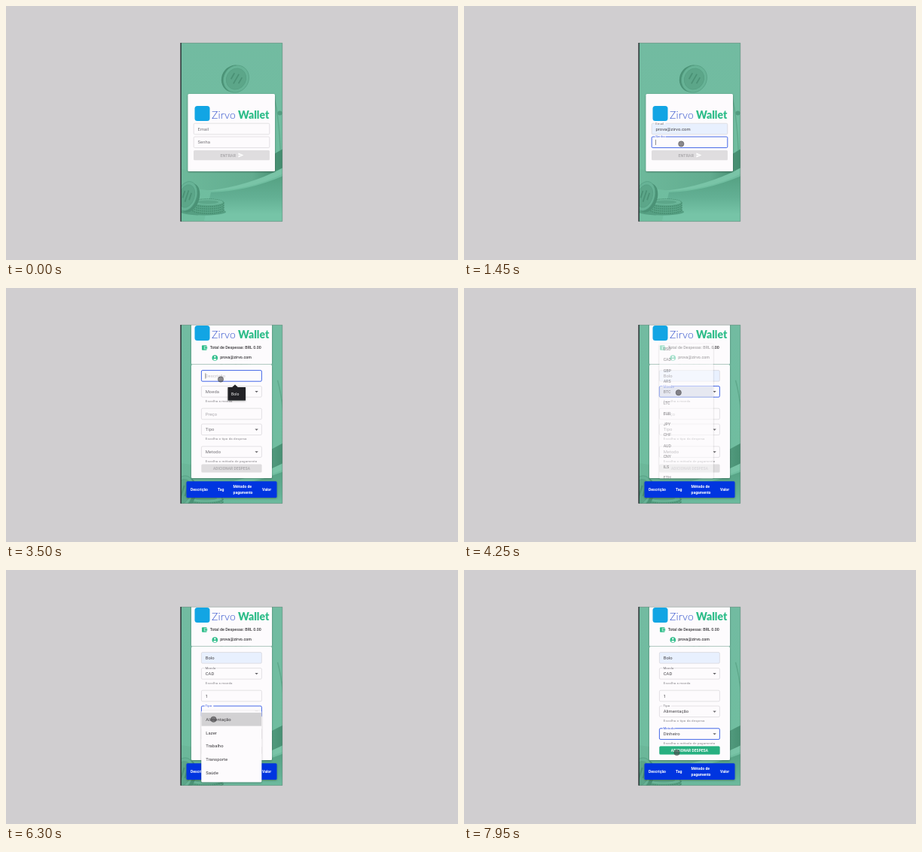
These frames come from a looping animation (600 by 338 pixels, 8 s). An HTML page:

```html
<!DOCTYPE html>
<html lang="pt-BR">
<head>
<meta charset="utf-8">
<title>Carteira</title>
<style>
  html, body { margin: 0; width: 100%; height: 100%; overflow: hidden; background: #d0ced0; }
  svg { display: block; }
  #stage { width: 100vw; height: 100vh; }
  text { font-family: Roboto, Arial, sans-serif; }
  .brand { font-family: Lato, sans-serif; }
</style>
</head>
<body>
<svg id="stage" viewBox="0 0 600 338">
  <defs>
    <linearGradient id="green" x2="0" y2="1">
      <stop offset="0" stop-color="#72bba1"/>
      <stop offset="1" stop-color="#6fbe9f"/>
    </linearGradient>
    <linearGradient id="dish">
      <stop offset="0" stop-color="#6db99b"/>
      <stop offset=".7" stop-color="#62ac8f"/>
      <stop offset="1" stop-color="#428a6d"/>
    </linearGradient>
    <linearGradient id="floor" x2="0" y2="1">
      <stop offset="0" stop-color="#55a183"/>
      <stop offset=".45" stop-color="#63b094"/>
      <stop offset=".8" stop-color="#76c4a7"/>
    </linearGradient>
    <clipPath id="phone"><path d="M232 49H367V286.7H232Z"/></clipPath>
    <filter id="shadow" x="-20%" y="-20%" width="140%" height="150%">
      <feDropShadow dx="0" dy=".8" stdDeviation="1.1" flood-opacity=".36"/>
    </filter>
  </defs>
  <rect width="600" height="338" fill="#d0ced0"/>
  <g clip-path="url(#phone)">
    <rect x="232" y="49" width="136" height="238" fill="url(#green)"/>
    <g id="scene">
      <path d="M355 118Q364 150 365 220" fill="none" stroke="#5fa98c" stroke-width="1.4"/>
      <circle cx="363.5" cy="142.5" r="3" fill="#539c80"/>
      <path d="M272 248Q322 246 368 226V290H262Z" fill="url(#floor)"/>
      <path d="M232 217Q300 232 368 190V222Q322 243 272 246L232 240Z" fill="url(#dish)"/>
      <path d="M368 223Q322 246 266 246Q322 240 368 215Z" fill="#79c4a7"/>
      <g id="coins"></g>
    </g>
    <g id="screen"></g>
    <g id="pointer"></g>
  </g>
  <path d="M232 49.3H366.8V286.6H232" fill="none" stroke="#6c857b" stroke-width=".5"/>
  <path d="M232.1 49V286.8" stroke="#20282a" stroke-width="1.4"/>
</svg>
<script>
const LOOP = 8000;
const BLUE = '#0636e0', GREEN = '#2fbd8a', TINT = '#e8f0fe', PAPER = '#fdfbfd';
const EMAIL = 'prova@zirvo.com';
const $ = id => document.getElementById(id);
const clamp = v => Math.max(0, Math.min(1, v));
const ease = v => { v = clamp(v); return v * v * (3 - 2 * v); };
const mix = (a, b, p) => a + (b - a) * p;
const within = (t, a, b) => t >= a && t < b;
const blink = (t, from) => t >= from && (t - from) % 1000 < 500;

const rect = (x, y, w, h, fill, more = '') =>
  `<rect x="${x}" y="${y}" width="${w}" height="${h}" fill="${fill}" ${more}/>`;
const label = (x, y, size, fill, str, more = '') =>
  `<text x="${x}" y="${y}" font-size="${size}" fill="${fill}" ${more}>${str}</text>`;
const card = (x, y, w, h, fill = PAPER) => rect(x, y, w, h, fill, 'rx="1.5" filter="url(#shadow)"');

function coin(x, y, rx, ry, turn, depth) {
  const ring = (k, fill) => `<ellipse rx="${rx * k}" ry="${ry * k}" fill="${fill}" stroke="#559f82" stroke-width=".7"/>`;
  return `<g transform="translate(${x} ${y}) rotate(${turn})">
    <ellipse cx="${depth}" cy="1" rx="${rx}" ry="${ry}" fill="#4b9276"/>${ring(1, '#67b396')}${ring(.78, '#5ca689')}
    <path d="M${-rx * .35} ${-ry * .3}v${ry * .5}M0 ${-ry * .4}v${ry * .8}M${rx * .35} ${-ry * .3}v${ry * .5}" stroke="#4b9276" stroke-width="1.8"/></g>`;
}

// Milled edges come from a dashed stroke around each coin of the stack.
const pile = [271, 268, 265, 262].map(y =>
  `<ellipse cx="268" cy="${y}" rx="21" ry="5" fill="#5ba688" stroke="#478d70" stroke-width="1.6" stroke-dasharray="1.6 1"/>`).join('');
$('coins').innerHTML = coin(305.5, 97, 16.5, 18.5, 30, -2.5) +
  '<ellipse cx="262" cy="274" rx="30" ry="4.5" fill="#559f82"/>' + pile +
  '<ellipse cx="268" cy="261" rx="20" ry="4" fill="#6bb699"/><ellipse cx="268" cy="261" rx="14" ry="2.4" fill="#5ca689"/>' +
  coin(240, 253, 13, 20, 18, 4);

function brand(y) {
  return rect(250.5, y, 20, 20, '#12a5e4', 'rx="3.5"') +
    label(273, y + 17, 14, '#2e50cc', 'Zirvo', 'class="brand" font-weight="300" letter-spacing=".2"') +
    label(308, y + 17, 14, GREEN, 'Wallet', 'class="brand" font-weight="900"');
}

// Outlined input; "lift" moves the label from the middle onto the border.
function field(x, y, w, name, o) {
  const h = 14.6, lift = o.lift || 0, tx = x + 5.3;
  const edge = o.focus ? BLUE : '#c9c7cb';
  let out = rect(x, y, w, h, o.fill || PAPER, `rx="1.5" stroke="${edge}" stroke-width="${o.focus ? .75 : .5}"`);
  if (lift > 0) out += rect(tx - 1, y - 1, (name.length * 2.4 + 2) * lift, 2, PAPER);
  if (name && !(o.hint && o.value)) {
    const tone = o.hint ? (o.focus ? '#c2c0c4' : '#a9a7ab') : o.focus ? '#3a5be0' : '#757378';
    out += label(mix(tx, tx - .3, lift), mix(y + 9.4, y + 1.4, lift), mix(5.87, 4.4, lift), tone, name, 'letter-spacing=".055"');
  }
  if (o.value) out += label(tx, y + 9.4, o.size || 5.87, '#444247', o.value, 'letter-spacing=".055"');
  if (o.caret) out += rect(tx + (o.caretX || 0), y + 3.8, .5, 7.2, '#222');
  if (o.select) out += `<path d="M${x + w - 9} ${y + 6.4}h4.4l-2.2 2.3z" fill="#69676b"/>`;
  return out;
}

function tip(x, y, w, h, tail, str) {
  return `<path d="M${tail - 4} ${y + .2}l4-3.7 4 3.7z" fill="#222325"/>` +
    rect(x, y, w, h, '#222325', 'filter="url(#shadow)"') + label(x + 4.6, y + h / 2 + 1.8, 5.1, '#f4f4f4', str);
}

function menu(t, m) {
  if (!within(t, m.open, m.close + 200)) return '';
  const p = ease((t - m.open) / 220);
  const alpha = Math.min(p, 1 - clamp((t - m.close) / 200));
  const hot = m.hot(t);
  const rows = m.items.map((name, i) => {
    const y = m.first + i * m.step;
    return (i === hot ? rect(0, y - m.step / 2 - m.y, 80, m.step, m.tone || '#d2d1d3') : '') +
      label(6, y + 2.1 - m.y, 5.87, '#38363a', name, 'letter-spacing=".055"');
  }).join('');
  return `<g opacity="${alpha}" transform="translate(259.3 ${m.pivot}) scale(${mix(.75, 1, p)} ${mix(.56, 1, p)}) translate(-259.3 ${-m.pivot})">
    ${card(259.3, m.y, 80, m.h)}<svg x="259.3" y="${m.y}" width="80" height="${m.h}">${rows}</svg></g>`;
}

const menus = [
  { open: 4130, close: 5000, y: 60, h: 220, first: 68.5, step: 17.55, pivot: 138, tone: '#d5dbe8',
    items: 'USD CAD GBP ARS BTC LTC EUR JPY CHF AUD CNY ILS ETH'.split(' '),
    hot: t => t < 5000 ? Math.max(1, Math.round((aim(t).y - 68.5) / 17.55)) : 1 },
  { open: 6080, close: 6540, y: 187.3, h: 95, first: 198.7, step: 17.8, pivot: 195,
    items: ['Alimentação', 'Lazer', 'Trabalho', 'Transporte', 'Saúde'], hot: () => 0 },
  { open: 7000, close: 7500, y: 222.8, h: 59.4, first: 234.7, step: 17.8, pivot: 226,
    items: ['Dinheiro', 'Cartão de crédito', 'Cartão de débito'], hot: () => 0 }
];

function login(t) {
  const ready = t >= 2250;
  const typed = [1600, 1680, 1750, 1920, 2080, 2250].filter(k => t >= k).length;
  const preview = within(t, 830, 980), mailFocus = within(t, 480, 1230), passFocus = t >= 1230;
  let out = card(241.5, 117, 115.5, 103) + brand(133);
  out += field(249.2, 156.2, 100.6, 'Email', {
    lift: ease((t - 480) / 200), focus: mailFocus, fill: t >= 830 ? TINT : '',
    value: t >= 830 ? EMAIL : '', size: preview ? 5.1 : 5.87, caret: mailFocus && t < 830
  });
  out += field(249.2, 174, 100.6, 'Senha', {
    lift: ease((t - 1230) / 200), focus: passFocus,
    caret: passFocus && blink(t, typed === 6 ? 2250 : 1230), caretX: typed * 2.15
  });
  for (let i = 0; i < typed; i++) out += `<circle cx="${255.4 + i * 2.15}" cy="181.4" r=".75" fill="#333"/>`;
  out += rect(249, 192, 101, 13.3, ready ? BLUE : '#dfdddf', 'rx="1.5"');
  out += label(284.5, 200.6, 5.2, ready ? '#fff' : '#a5a3a6', 'ENTRAR', `font-weight="${ready ? 700 : 500}" letter-spacing=".15"`);
  out += '<path transform="translate(307.8 194.6) scale(.33)" d="M2 21L23 12 2 3V10L17 12 2 14Z" fill="#fff"/>';
  if (within(t, 700, 980)) out += tip(288.5, 181, 52, 17, 297, EMAIL);
  return out;
}

function wallet(t) {
  const bold = 'font-weight="700"', mid = 'font-weight="500"';
  const help = (y, str) => label(264.8, y, 4.4, '#858388', str, 'letter-spacing=".147"');
  const row = (y, name, o) => field(259.4, y, 80, name, o);
  const pick = (y, name, from, to, set, value) => row(y, name, {
    lift: ease((t - from) / 200), focus: within(t, from, to), value: t >= set ? value : '', select: true
  });
  const ready = t >= 7480;
  const descFocus = within(t, 3200, 4100), priceFocus = within(t, 5320, 6060);

  let out = card(246, 46, 107, 55.5) + brand(50);
  out += rect(260, 76.2, 6.6, 6.6, GREEN, 'rx="1"') + rect(263.2, 78, 4.2, 3, GREEN, 'stroke="#fff" stroke-width=".6"');
  out += label(270.8, 81.4, 5.35, '#3a383c', 'Total de Despesas: BRL 0.00', mid);
  out += `<circle cx="277.3" cy="93" r="3.8" fill="${GREEN}"/><circle cx="277.3" cy="91.6" r="1.2" fill="#fff"/>
    <path d="M274.8 95.1q2.5-2.4 5 0q-2.5 2.1-5 0z" fill="#fff"/>`;
  out += label(284.2, 94.4, 5.35, '#3a383c', EMAIL, mid);

  out += card(246, 102, 107, 151);
  out += row(109.6, 'Descrição', {
    hint: true, focus: descFocus, fill: t >= 3690 ? TINT : '', value: t >= 3690 ? 'Bolo' : '',
    caret: descFocus && t < 3690 && blink(t, 3200)
  });
  out += pick(130.6, 'Moeda', 4100, 5320, 4990, 'CAD') + help(151.9, 'Escolha a moeda');
  out += row(160.2, 'Preço', {
    hint: true, focus: priceFocus, value: t >= 5750 ? '1' : '',
    caret: priceFocus && blink(t, t >= 5750 ? 5750 : 5320), caretX: t >= 5750 ? 3.6 : 0
  });
  out += pick(181, 'Tipo', 6060, 6960, 6520, 'Alimentação') + help(202.2, 'Escolha o tipo da despesa');
  out += pick(210.8, 'Metodo', 6960, LOOP, 7480, 'Dinheiro') + help(232.1, 'Escolha o método de pagamento');

  const hover = ease((t - 7700) / 150);
  out += rect(259.3, 234.6, 80.3, 11, ready ? GREEN : '#dfdddf', 'rx="1.5"');
  if (ready) out += rect(259.3, 234.6, 80.3, 11, '#16885f', `rx="1.5" opacity="${hover * .25}"`);
  out += label(299.5, 241.8, 4.77, ready ? '#fff' : '#a5a3a6', 'ADICIONAR DESPESA', `font-weight="${ready ? 700 : 500}" letter-spacing=".136" text-anchor="middle"`);

  out += card(239.5, 257.2, 120, 21.8, BLUE);
  const heads = [[245, 269.9, 'Descrição'], [281, 269.9, 'Tag'], [301.5, 265.8, 'Método de'], [301.5, 273.9, 'pagamento'], [340, 269.9, 'Valor']];
  out += heads.map(([x, y, str]) => label(x, y, 5.14, '#fff', str, bold)).join('');

  out += menus.map(m => menu(t, m)).join('');
  if (within(t, 3400, 3780)) out += tip(294.5, 132, 23.5, 17.6, 304, 'Bolo');
  return out;
}

// Pointer stops: time, x, y
const stops = [
  [50, 373, 293], [420, 288, 164], [600, 288, 164], [830, 293, 186], [980, 293, 186],
  [1200, 288.3, 183.5], [2360, 288.3, 183.5], [2560, 297, 199], [2760, 297, 199],
  [3150, 285, 121.5], [3550, 285, 121.5], [3680, 300, 140], [3790, 300, 140],
  [4050, 286, 138], [4400, 284, 140], [4820, 280, 82], [5000, 280, 82],
  [5300, 278, 161], [5900, 278, 161], [6050, 276, 188], [6140, 276, 188],
  [6290, 275.5, 198.7], [6640, 275.5, 198.7], [6900, 279, 218], [7050, 279, 218],
  [7250, 278, 234], [7550, 278, 234], [7820, 282.5, 243], [8000, 282.5, 243]
];

function aim(t) {
  const i = stops.findIndex(s => s[0] > t);
  const b = stops[Math.max(i, 0)], a = stops[Math.max(i - 1, 0)];
  const p = ease((t - a[0]) / (b[0] - a[0] || 1));
  return { x: mix(a[1], b[1], p), y: mix(a[2], b[2], p) };
}

function drawPointer(t) {
  const { x, y } = aim(t);
  const arrow = within(t, 780, 980) || within(t, 3650, 3780);
  return arrow
    ? `<path transform="translate(${x} ${y})" d="M0 0V5.6L1.4 4.4 2.3 6.4 3.2 6 2.3 4.1H4.1Z" fill="#111" stroke="#fff" stroke-width=".6"/>`
    : `<circle cx="${x}" cy="${y}" r="3.7" fill="#4a484b" fill-opacity=".64" stroke="#333" stroke-opacity=".5" stroke-width=".7"/>`;
}

function draw(t) {
  const inside = t >= 2750;
  $('scene').setAttribute('transform', inside ? 'translate(-30 -7) scale(1.1)' : '');
  $('screen').innerHTML = inside ? wallet(t) : login(t);
  $('pointer').innerHTML = drawPointer(t);
}

const start = performance.now();
function tick() {
  draw((performance.now() - start) % LOOP);
  requestAnimationFrame(tick);
}
tick();
</script>
</body>
</html>
```
